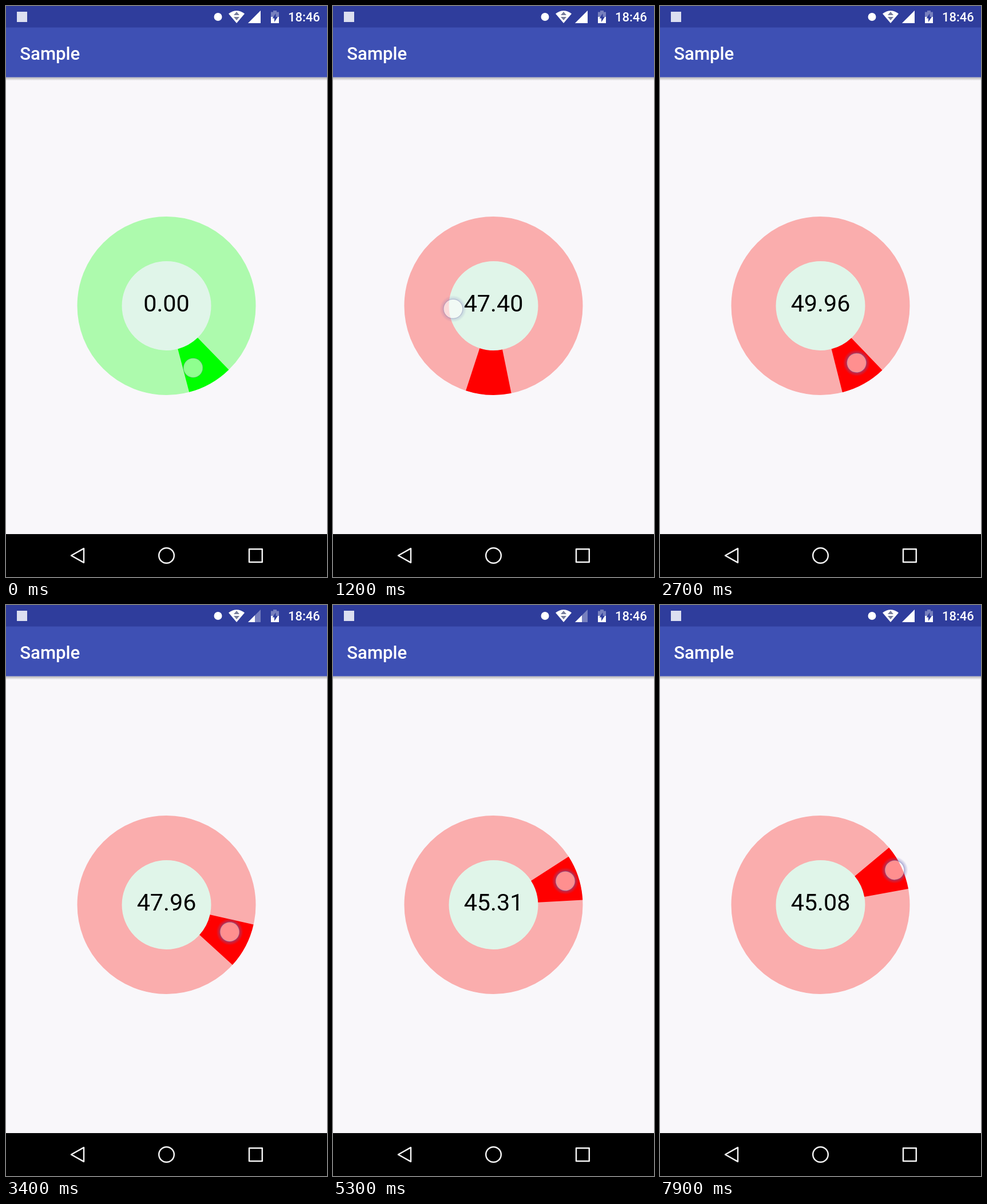
An HTML page for the animation above (8 s loop, 561 by 998 pixels).

```html
<!DOCTYPE html>
<html lang="en">
<head>
<meta charset="utf-8">
<title>Sample</title>
<style>
  html, body { margin: 0; height: 100%; overflow: hidden; background: #f9f7fa; }
  svg { display: block; width: 100vw; height: 100vh; }
  text { font-family: Roboto, sans-serif; }
  .bar { font-weight: 500; fill: #fff; }
  .nav { fill: none; stroke: #f4f4f4; stroke-width: 2.5; stroke-linejoin: round; }
</style>
</head>
<body>
<svg viewBox="0 0 561 998">
  <defs>
    <linearGradient id="shade" x2="0" y2="1">
      <stop stop-color="#000" stop-opacity=".28"/>
      <stop offset="1" stop-color="#000" stop-opacity="0"/>
    </linearGradient>
    <radialGradient id="halo">
      <stop offset=".68" stop-color="#6464b4" stop-opacity="0"/>
      <stop offset=".72" stop-color="#6464b4" stop-opacity=".45"/>
      <stop offset="1" stop-color="#6464b4" stop-opacity="0"/>
    </radialGradient>
  </defs>
  <rect width="561" height="998" fill="#f9f7fa"/>

  <rect y="124.5" width="561" height="6" fill="url(#shade)"/>
  <rect width="561" height="124.5" fill="#3e50b4"/>
  <rect width="561" height="37.5" fill="#2f3d9c"/>
  <text class="bar" x="24.2" y="93.5" font-size="31.2">Sample</text>

  <!-- status icons -->
  <rect x="19" y="10" width="18" height="18" fill="#dcdff0"/>
  <circle cx="370.5" cy="19" r="7" fill="#fff"/>
  <path d="M389 13.5Q403 3 417 13.5L403 30Z" fill="#fff"/>
  <path d="M403 10l5 6h-10zM403 25l5-6h-10z" fill="#777d9c"/>
  <path d="M445 8V30H423Z" fill="#fff" fill-opacity=".35"/>
  <path id="signal" fill="#fff"/>
  <path d="M463 10.5h4V8h6v2.5h4V30h-14z" fill="#fff" fill-opacity=".35"/>
  <path d="M463 19h14V30h-14z" fill="#fff"/>
  <path d="M471.5 13v6h3.5l-6 9v-6.5h-3.5z" fill="#2f3d9c"/>
  <text class="bar" x="493" y="27" font-size="22">18:46</text>

  <!-- wheel -->
  <g transform="translate(280.5 524)">
    <circle r="79" fill="#e0f5e9"/>
    <circle id="ring" r="117" fill="none" stroke-width="78"/>
    <path id="wedge" d="M75.4-19.9L150.8-39.8A156 156 0 0 1 150.8 39.8L75.4 19.9A78 78 0 0 0 75.4-19.9Z"/>
    <text id="label" y="10" font-size="41.3" text-anchor="middle"></text>
    <g id="touch">
      <circle id="glow" r="23.5" fill="url(#halo)"/>
      <circle r="16.8" fill="#fff" fill-opacity=".56" stroke="#7878aa" stroke-opacity=".4"/>
    </g>
  </g>

  <rect y="923" width="561" height="75"/>
  <path class="nav" d="M114 960.5L136 948.2V972.8Z"/>
  <circle class="nav" cx="280.5" cy="960.5" r="13.3"/>
  <rect class="nav" x="425" y="949.2" width="22.8" height="22.8"/>
</svg>
<script>
const LOOP = 8000, STEP = 100;
const MAX = 50, HALF = MAX / 2;
const LAG = 85;           // the wheel trails the touch, in ms
const SPIN_END = 2400;

// Time, wheel angle in degrees over whole turns, touch radius, units wound.
const KEYS = [
  [0, 60.5, 118, 0],
  [700, 370.8, 78, 17.6],
  [1700, 1247.5, 70.5, 67.3],
  [SPIN_END, 1501.7, 118, MAX],
  [2700, 1501, 118, 49.96],
  [4200, 1435, 125, 46.03],
  [6700, 1417.5, 141, 45.13],
  [7900, 1414.9, 143, 45.08],
];
const [ANGLE, REACH, WOUND] = [1, 2, 3];
const $ = id => document.getElementById(id);

// Tangent by central difference, flat at ends and turning points.
function tangent(i, col) {
  const a = KEYS[i - 1], b = KEYS[i], c = KEYS[i + 1];
  if (!a || !c || (b[col] - a[col]) * (c[col] - b[col]) <= 0) return 0;
  return (c[col] - a[col]) / (c[0] - a[0]);
}

function at(t, col) {
  let i = 0;
  while (i < KEYS.length - 2 && t >= KEYS[i + 1][0]) i++;
  const a = KEYS[i], b = KEYS[i + 1], d = b[0] - a[0];
  const u = Math.min(1, (t - a[0]) / d), w = 1 - u;
  return a[col] * w * w * (1 + 2 * u) + b[col] * u * u * (3 - 2 * u)
    + d * u * w * (tangent(i, col) * w - tangent(i + 1, col) * u);
}

function draw(t) {
  const value = Math.min(MAX, at(t, WOUND));
  const [strong, pale] = value < HALF ? ["#0f0", "#adfaad"] : ["#f00", "#faadad"];
  $("ring").setAttribute("stroke", pale);
  $("wedge").setAttribute("fill", strong);
  $("wedge").setAttribute("transform", `rotate(${at(t, ANGLE)})`);
  $("label").textContent = value.toFixed(2);

  $("touch").setAttribute("transform", `rotate(${at(t + LAG, ANGLE)}) translate(${at(t, REACH)})`);
  $("glow").setAttribute("opacity", Math.min(1, t / SPIN_END));

  const weak = t >= 3100 && t < 6000;
  $("signal").setAttribute("d", weak ? "M435 18V30H423Z" : "M445 8V30H423Z");
}

function tick(now) {
  draw(Math.floor(now % LOOP / STEP) * STEP);
  requestAnimationFrame(tick);
}
draw(0);
requestAnimationFrame(tick);
</script>
</body>
</html>
```
